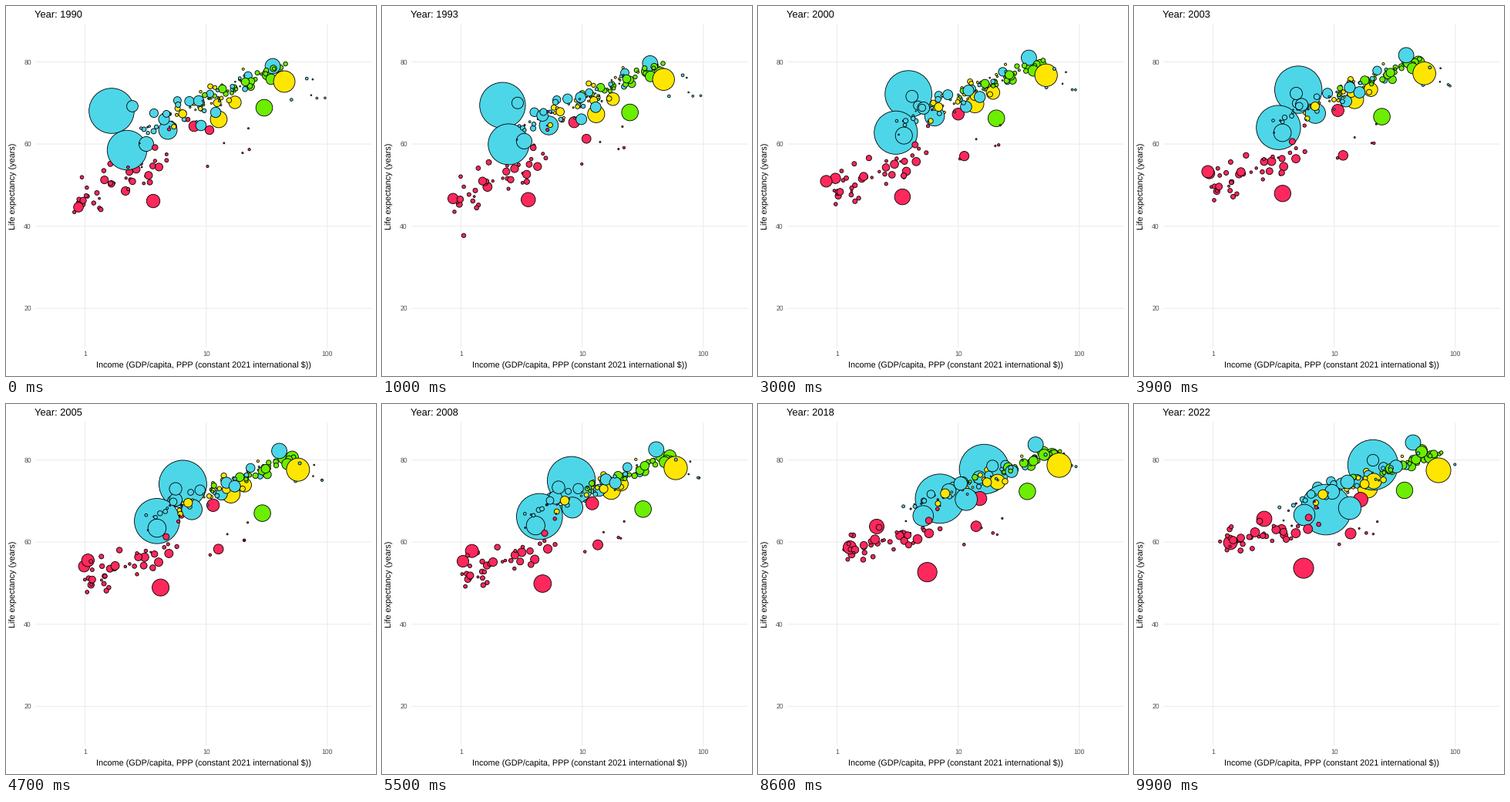
These frames come from a looping animation (480x480 px, 10000 ms). A matplotlib script:

```python
import numpy as np
import matplotlib.pyplot as plt
from matplotlib.animation import FuncAnimation

SIZE, DPI, FRAMES = 480, 100, 100
PT = 72 / DPI
LAST = FRAMES - 1
ASIA, AFRICA, EUROPE = "#4dd6e8", "#ff285c", "#6cee00"
AMERICAS, OCEANIA = "#ffe600", "#9030ff"

plt.rcParams["font.family"] = "Liberation Sans"
plt.rcParams["text.hinting"] = "none"
rng = np.random.default_rng(7)
steps = np.arange(FRAMES)
u = steps / LAST
# Life expectancy sinks after 2019, is lowest in 2021, then recovers a little.
pandemic = np.interp(1990 + 32 * u, [2019, 2020, 2021, 2022], [0, 0.4, 1.1, 1])
bubbles = []


def add(name, color, pop, x, y):
    bubbles.append((name, color, 0.35 + 0.86 * np.sqrt(pop), x, y))


def track(name, color, pops, *points, covid=0):
    """Large country: path through evenly timed stage points."""
    px, py = zip(*points)
    times = np.linspace(0, LAST, len(points))
    add(name, color, np.linspace(*pops, FRAMES), np.interp(steps, times, px),
        np.interp(steps, times, py) + covid * pandemic)


def cloud(color, count, span, gain, start, end, spread, pop, ease=1.0):
    """Other countries: drift from one trend line to another.

    A trend line is (y at x = 200, slope); pop is (median, sigma, limit).
    """
    knots = np.linspace(0, LAST, 17)
    median, sigma, limit = pop
    for _ in range(count):
        x0 = rng.uniform(*span)
        x1 = x0 + rng.normal(gain, 12)
        off = rng.normal(0, spread)
        y0 = start[0] - start[1] * (x0 - 200) + off
        y1 = end[0] - end[1] * (x1 - 200) + 0.6 * off
        wobble = [np.interp(steps, knots, rng.normal(0, 1.1, 17)) for _ in "xy"]
        people = np.clip(median * np.exp(rng.normal(0, sigma)), 0.06, limit)
        add(rng.choice(list("abcdefgilmnstuv")), color, people * (1 + 0.4 * u),
            x0 + (x1 - x0) * u + wobble[0],
            y0 + (y1 - y0) * u ** ease + wobble[1] + 4 * pandemic)


track("chi", ASIA, (1135, 1412), (137, 136), (201, 112), (268, 93), (310, 79))
track("ind", ASIA, (870, 1425), (157, 187), (181, 162), (216, 138), (249, 113), covid=24)
track("indo", ASIA, (182, 278), (210, 161), (231, 141), (255, 131), (280, 119), covid=16)
track("pak", ASIA, (115, 244), (182, 179), (190, 167), (204, 153), (221, 140), covid=4)
track("jap", ASIA, (123, 125), (346, 78), (355, 60), (362, 50))
track("phi", ASIA, (62, 115), (205, 147), (221, 123), (257, 109), covid=5)
track("vie", ASIA, (67, 98), (164, 130), (223, 109), (277, 101))
track("tha", ASIA, (55, 72), (250, 123), (288, 101), (310, 73))
track("tur", ASIA, (55, 85), (272, 138), (298, 105), (340, 81))
track("ira", ASIA, (56, 89), (253, 155), (281, 115), (289, 88), covid=12)

track("rus", EUROPE, (148, 145), (335, 132), (302, 147), (336, 141), (348, 120),
      (351, 106), covid=6)
track("ger", EUROPE, (79, 84), (358, 92), (372, 68), (385, 65), covid=4)
track("uk", EUROPE, (57, 67), (344, 95), (366, 77), (373, 62))
track("fra", EUROPE, (58, 68), (339, 89), (361, 69), (373, 60))

track("us", AMERICAS, (250, 333), (361, 98), (375, 89), (384, 80), (395, 79), covid=7)
track("bra", AMERICAS, (150, 215), (276, 147), (282, 125), (305, 105), (303, 99), covid=10)
track("mex", AMERICAS, (82, 128), (297, 125), (310, 104), (311, 100))

track("nig", AFRICA, (95, 219), (191, 253), (187, 247), (219, 226), (220, 213))
track("eth", AFRICA, (48, 123), (94, 261), (88, 224), (131, 174), (169, 149))
track("con", AFRICA, (36, 99), (155, 240), (95, 222), (110, 195), (125, 180))
track("egy", AFRICA, (57, 111), (244, 156), (270, 130), (294, 120), covid=4)
track("sou", AFRICA, (39, 60), (264, 161), (268, 198), (286, 175), (281, 148), covid=20)

cloud(ASIA, 31, (175, 320), 36, (146, 0.42), (123, 0.32), 9, (7, 1.5, 45))
cloud(ASIA, 6, (340, 425), 0, (107, 0), (67, 0), 10, (1, 0.9, 9))
cloud(EUROPE, 36, (252, 370), 34, (146, 0.42), (123, 0.32), 5, (5, 1.2, 45))
cloud(AMERICAS, 29, (212, 312), 27, (146, 0.42), (125, 0.32), 9, (3, 1.6, 32))
cloud(AFRICA, 41, (92, 212), 22, (203, 0.5), (160, 0.2), 15, (8, 0.9, 30), 1.7)
cloud(AFRICA, 6, (230, 315), 8, (178, 0), (160, 0), 16, (1.5, 1, 10))
cloud(OCEANIA, 8, (170, 225), 18, (160, 0.3), (140, 0.3), 8, (0.4, 1.2, 8))

# The 1994 catastrophe: a deep, short plunge of one small country.
plunge = 178 * np.clip(1 - np.abs(steps - 12) / 3, 0, 1)
add("rwa", AFRICA, 7 + 7 * u, 104 + 63 * u ** 1.5, 246 - 75 * u + plunge)

bubbles.sort(key=lambda b: b[0])
colors = [b[1] for b in bubbles]
radii, xs, ys = (np.array([b[k] for b in bubbles]) for k in (2, 3, 4))

fig = plt.figure(figsize=(SIZE / DPI, SIZE / DPI), dpi=DPI, facecolor="white")
ax = fig.add_axes([0, 0, 1, 1])
ax.set(xlim=(0, SIZE), ylim=(SIZE, 0))
ax.axis("off")


def label(x, y, text, px, va="baseline", **kw):
    return ax.text(x, y, text, fontsize=px * PT, va=va, **kw)


def grid(x, y):
    ax.plot(x, y, color="#ebebeb", lw=1.07 * PT, zorder=0,
            solid_capstyle="butt", snap=False)


for k in range(3):
    x = 102.6 + 157.1 * k
    grid([x, x], [24, 443.5])
    label(x, 454.1, str(10 ** k), 8.7, ha="center", color="#4d4d4d")
for age in range(20, 81, 20):
    y = 72.5 + (80 - age) * 5.33
    grid([38, 474.5], [y, y])
    label(32.8, y + 3.1, str(age), 8.7, ha="right", color="#4d4d4d")
label(256, 468.3, r"Income (GDP/capita, PPP (constant 2021 international \$))",
      10.85, ha="center")
label(9.6, 233.7, "Life expectancy (years)", 10.85, va="center", ha="center",
      rotation=90)
title = label(37.3, 15, "", 12.95)
dots = ax.scatter(xs[:, 0], ys[:, 0], s=1, c=colors, edgecolors="black",
                  linewidths=0.85 * PT, zorder=2)


def update(i):
    dots.set_offsets(np.column_stack((xs[:, i], ys[:, i])))
    dots.set_sizes((2 * radii[:, i] * PT) ** 2)
    title.set_text(f"Year: {round(1990 + 32 * i / LAST)}")
    return dots, title


anim = FuncAnimation(fig, update, frames=FRAMES, interval=100, repeat=True,
                     repeat_delay=0)
plt.show()
```
